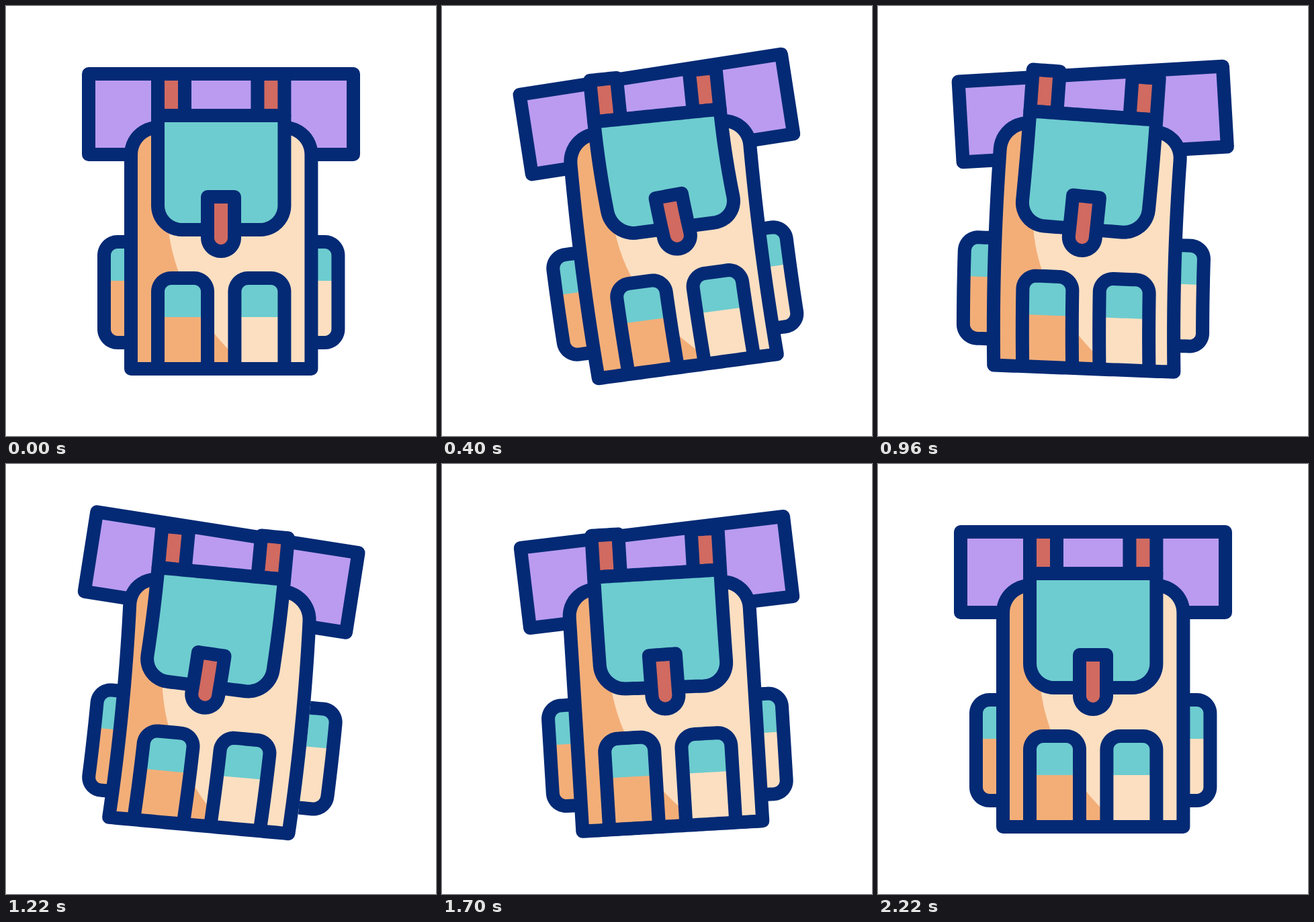
These frames come from a looping animation (640 by 640 pixels, 2400 ms). An HTML page with a canvas:

```html
<!DOCTYPE html>
<html lang="en">
<head>
<meta charset="utf-8">
<title>Swinging backpack</title>
<style>
html, body { margin: 0; width: 100%; height: 100%; overflow: hidden; background: #fff; }
canvas { display: block; width: 100vmin; height: 100vmin; }
</style>
</head>
<body>
<canvas id="stage"></canvas>
<script>
const canvas = document.getElementById('stage');
const ctx = canvas.getContext('2d');
const LOOP = 2400, STEP = 20;
const CX = 320.2, PIVOT = 165, RAD = Math.PI / 180;
const NAVY = '#042a75', TEAL = '#6dcccf', PURPLE = '#ba9bf0',
      RED = '#d16a60', ORANGE = '#f3ae78', CREAM = '#fcdfc1';

// Smooth swing through five poses, at rest on both ends
const TIMES = [100, 400, 660, 960, 1220, 1600, 1700, 2220];
function swing(t, [a, b, c, d, e]) {
  const v = [0, a, b, c, d, e * 1.05, e, 0], last = v.length - 1;
  if (t <= TIMES[0] || t >= TIMES[last]) return 0;
  const rate = i => (v[i + 1] - v[i]) / (TIMES[i + 1] - TIMES[i]);
  const slope = i => {
    if (i === 0 || i === last) return 0;
    const p = TIMES[i] - TIMES[i - 1], n = TIMES[i + 1] - TIMES[i];
    return (rate(i - 1) * n + rate(i) * p) / (p + n);
  };
  let i = 0;
  while (t >= TIMES[i + 1]) i++;
  const h = TIMES[i + 1] - TIMES[i], s = (t - TIMES[i]) / h, r = 1 - s;
  return v[i] * (1 + 2 * s) * r * r + slope(i) * h * s * r * r
       + v[i + 1] * s * s * (3 - 2 * s) - slope(i + 1) * h * s * s * r;
}

const ROLL = [[100, 0], [690, 17.1], [1210, -8.9], [1790, 7.8], [2220, 0]];
function rollAngle(t) {
  for (let i = 1; i < ROLL.length; i++) {
    const [t0, a] = ROLL[i - 1], [t1, b] = ROLL[i];
    if (t >= t0 && t < t1) {
      return a + (b - a) * (1 - Math.cos(Math.PI * (t - t0) / (t1 - t0))) / 2;
    }
  }
  return 0;
}

// Bends the cloth around the pivot: k0 and bend shape the middle line,
// angle(h) turns each cross-section.
function makeWarp(len, k0, bend, angle, shift = 0) {
  return ([x, y]) => {
    const h = y - PIVOT;
    const k = k0 + bend / len * Math.max(h, 0) / len;
    const f = angle(h), u = x - CX;
    return [CX + shift + k * h + u * Math.cos(f),
            y - k * k * h / 1.5 - u * Math.sin(f)];
  };
}

const mirror = list => list.map(([x, y, r]) => [2 * CX - x, y, r]);

// Corner list [x, y, radius] to closely spaced points
function outline(list, closed) {
  const out = [], n = list.length;
  const line = p => {
    const q = out[out.length - 1];
    if (q) {
      const m = Math.ceil(Math.hypot(p[0] - q[0], p[1] - q[1]) / 6);
      for (let j = 1; j < m; j++) {
        out.push([q[0] + (p[0] - q[0]) * j / m, q[1] + (p[1] - q[1]) * j / m]);
      }
    }
    out.push(p);
  };
  const unit = (a, b) => {
    const d = Math.hypot(b[0] - a[0], b[1] - a[1]);
    return [(b[0] - a[0]) / d, (b[1] - a[1]) / d];
  };
  list.forEach((c, i) => {
    const r = c[2];
    if (!r) return line([c[0], c[1]]);
    const u = unit(c, list[(i + n - 1) % n]), v = unit(c, list[(i + 1) % n]);
    for (let j = 0; j <= 12; j++) {
      const a = j / 12 * Math.PI / 2, co = 1 - Math.cos(a), si = 1 - Math.sin(a);
      const p = [c[0] + r * (u[0] * si + v[0] * co), c[1] + r * (u[1] * si + v[1] * co)];
      j ? out.push(p) : line(p);
    }
  });
  if (closed) line(out[0]);
  return out;
}

function draw(warp, list, fill, stroke = true, closed = true) {
  ctx.beginPath();
  outline(list, closed).forEach(p => ctx.lineTo(...warp(p)));
  if (closed) ctx.closePath();
  if (fill) { ctx.fillStyle = fill; ctx.fill(); }
  if (stroke) ctx.stroke();
}

const box = (l, t, r, b) => [[l, t], [r, t], [r, b], [l, b]];

const SIDE = [[186, 351], [146, 351, 20], [146, 501, 20], [186, 501]];
const SIDE_LOW = [[186, 409], [146, 409], [146, 501, 20], [186, 501]];
const BODY = [[186, 540], [186, 181, 40], [454.4, 181, 40], [454.4, 540]];
const FRONT = [[226, 540], [226, 405, 20], [300, 405, 20], [300, 540]];
const FLAP = [[226, 163], [414.4, 163], [414.4, 333, 36], [226, 333, 36]];
const STRAP = box(226, 101, 266, 163);
const CLIP = [[300, 284], [340, 284], [340, 365, 20], [300, 365, 20]];

const SHADE = [[350, 540], [186, 540], [186, 181, 40], [240, 181]];
for (let i = 0; i <= 20; i++) {
  const s = i / 20, r = 1 - s;
  SHADE.push([240 * r * r + 490 * r * s + 345 * s * s,
              310 * r * r + 860 * r * s + 525 * s * s]);
}

function drawRoll(t) {
  ctx.save();
  ctx.translate(320, PIVOT);
  ctx.rotate(-rollAngle(t) * RAD);
  ctx.fillStyle = PURPLE;
  ctx.fillRect(-197, -64, 394, 120);
  ctx.strokeRect(-197, -64, 394, 120);
  ctx.restore();
}

function drawBody(t, tilt) {
  const end = swing(t, [7.7, 11.3, -2.2, -5.2, 3.3]) * RAD;
  const k0 = swing(t, [28, 30, -32, -12, 23]) / 365;
  const bend = swing(t, [16, 37.5, 18, -20, -0.5]);
  const angle = h => tilt + (end - tilt) * Math.min(h / 200, 1);
  const layer = (...poses) => makeWarp(365, k0, bend, angle, swing(t, poses));

  const left = layer(-3, -6, -5, 2, -1), right = layer(-1, -1, 3, 10, -1);
  draw(left, SIDE, TEAL, false);
  draw(left, SIDE_LOW, ORANGE, false);
  draw(left, SIDE, null, true, false);
  draw(right, mirror(SIDE), TEAL, false);
  draw(right, mirror(SIDE_LOW), CREAM, false);
  draw(right, mirror(SIDE), null, true, false);

  const body = layer(0, 0, 0, 0, 0);
  draw(body, BODY, CREAM, false);
  draw(body, SHADE, ORANGE, false);

  const front = layer(5.5, 12, 3, -3, 0);
  const low = box(226, 463, 300, 540);
  draw(front, FRONT, TEAL, false);
  draw(front, low, ORANGE, false);
  draw(front, FRONT, null, true, false);
  draw(front, mirror(FRONT), TEAL, false);
  draw(front, mirror(low), CREAM, false);
  draw(front, mirror(FRONT), null, true, false);

  draw(body, BODY, null);
}

function drawFlap(t, tilt) {
  const len = 168, k0 = Math.tan(tilt);
  const bend = swing(t, [10.1, 14.5, -3, -5.9, 1.5]);
  const end = swing(t, [7.5, 10.5, -4.5, -7, 2]) * RAD;
  const cloth = makeWarp(len, k0, bend,
    h => tilt + (end - tilt) * Math.max(h, 0) / len);
  const clip = makeWarp(len, k0, bend,
    h => Math.atan(k0 + 2 * bend * h / len / len));
  draw(cloth, STRAP, RED);
  draw(cloth, mirror(STRAP), RED);
  draw(cloth, FLAP, TEAL);
  draw(clip, CLIP, RED);
}

function frame(now) {
  const t = Math.floor(now % LOOP / STEP) * STEP;
  const size = Math.min(innerWidth, innerHeight) || 640;
  const px = Math.round(size * (window.devicePixelRatio || 1));
  if (canvas.width !== px) canvas.width = canvas.height = px;
  ctx.setTransform(px / 640, 0, 0, px / 640, 0, 0);
  ctx.fillStyle = '#fff';
  ctx.fillRect(0, 0, 640, 640);
  ctx.strokeStyle = NAVY;
  ctx.lineWidth = 20;
  ctx.lineJoin = 'round';
  ctx.lineCap = 'butt';

  const tilt = swing(t, [5.8, 8.1, -4.06, -5.4, 3.4]) * RAD;
  drawRoll(t);
  drawBody(t, tilt);
  drawFlap(t, tilt);
}

const start = performance.now();
function tick() {
  frame(performance.now() - start);
  requestAnimationFrame(tick);
}
tick();
</script>
</body>
</html>
```
